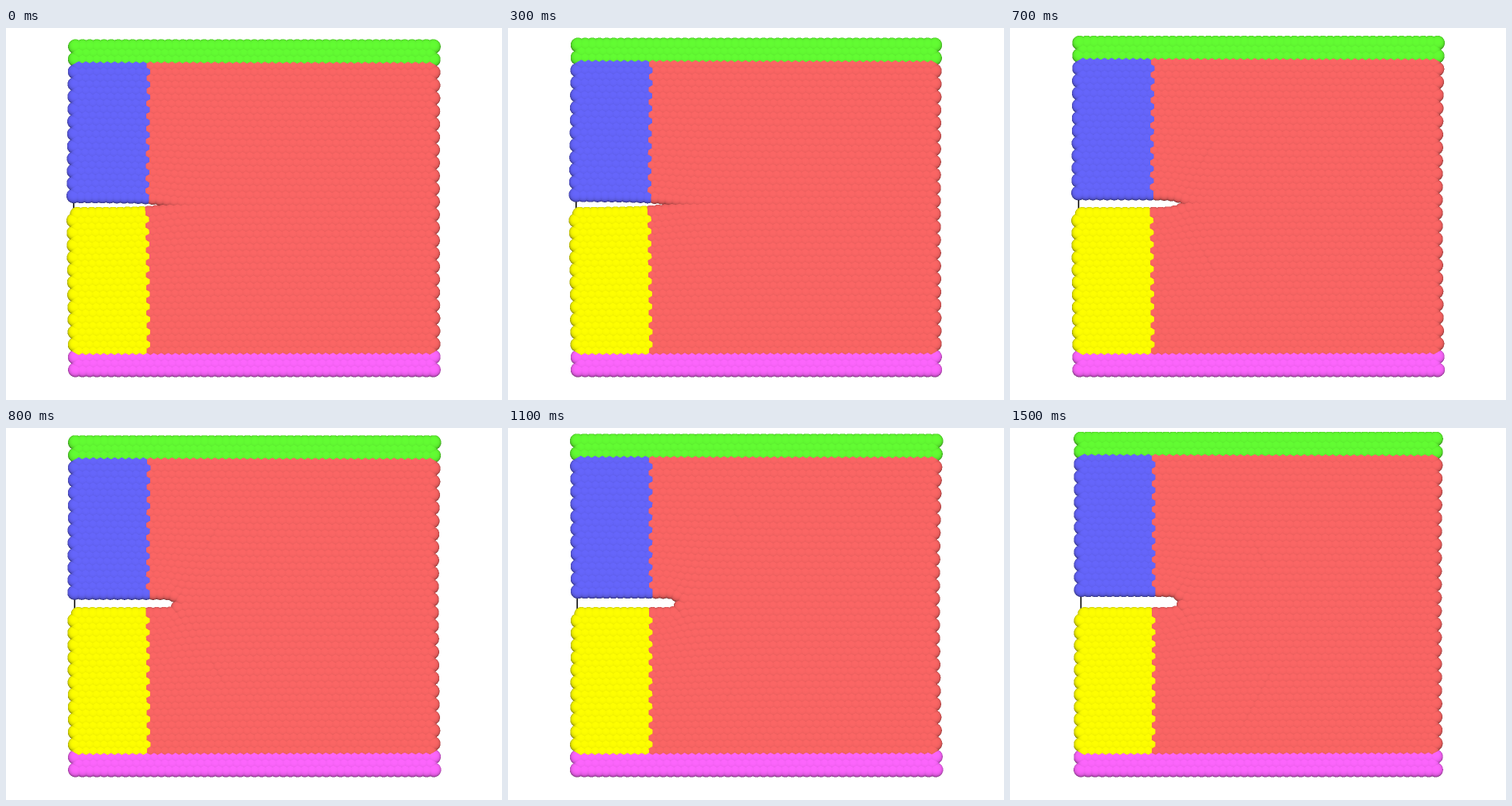
Recreate the animation shown at these times as an HTML page with a canvas. Size 640 by 480 pixels, loop 1600 ms.

```html
<!DOCTYPE html>
<html lang="en">
<head>
<meta charset="utf-8">
<title>Crack in a 2d lattice</title>
<style>
html, body { margin: 0; width: 640px; height: 480px; overflow: hidden; background: #fff; }
canvas { display: block; }
</style>
</head>
<body>
<canvas id="stage" width="640" height="480"></canvas>
<script>
const W = 640, H = 480, STEPS = 16, STEP_MS = 100;
const ROWS = 50, COLS = 50, BOTTOM = 441, R = 9.5;
const SS = 2; // supersampling

const RED = [251, 101, 100], BLUE = [101, 101, 251], YELLOW = [254, 254, 0],
      GREEN = [98, 252, 50], PINK = [252, 101, 252];

// step, left edge (corner, middle), right edge (corner, middle), crack tip x, tip softness
const POSES = [
  [0, 89.5, 87.3, 551.4, 550.4, 205, 30],
  [3, 90.3, 87.8, 550.6, 549.2, 207, 42],
  [5, 90.3, 88.3, 550.6, 549, 226, 28],
  [8, 89.5, 88.5, 552, 549.2, 219, 4],
  [11, 89.3, 90.3, 552, 548, 219, 4],
  [13, 91.2, 91.4, 550.5, 548.4, 219, 4],
  [15, 91.5, 92, 549.3, 547.8, 219, 4]
];

// dislocations: step, upper x, y, half length, lower x, y, half length
const SLIPS = [
  [3, 212, 222, 4, 212, 236, 4],
  [5, 230, 202, 14, 238, 265, 12],
  [8, 266, 142, 14, 270, 318, 12],
  [11, 294, 115, 10, 286, 345, 5],
  [13, 302, 128, 28, 301, 372, 8],
  [15, 322, 166, 12, 318, 347, 36]
];

function sample(table, k) {
  let n = 1;
  while (n < table.length - 1 && table[n][0] < k) n++;
  const a = table[n - 1], b = table[n];
  const f = (k - a[0]) / (b[0] - a[0]);
  return a.map((v, i) => v + (b[i] - v) * f);
}

function colorOf(i, j) {
  if (j < 3) return PINK;
  if (j > ROWS - 3) return GREEN;
  if (i > 10) return RED;
  return j > 25 ? BLUE : YELLOW;
}

function slipsAt(k) {
  if (k < 4) return [];
  const s = sample(SLIPS, k);
  const turn = k >= 11 ? 1 : -1; // they glide back after meeting the clamped rows
  return [
    { x: s[1], y: s[2], half: s[3], dx: 0.5, dy: 0.866 * turn },
    { x: s[4], y: s[5], half: s[6], dx: 0.5, dy: -0.866 * turn }
  ];
}

// opens a thin seam along a slip segment
function pushApart(p, s) {
  const x = p.x - s.x, y = p.y - s.y;
  const along = x * s.dx + y * s.dy, across = x * s.dy - y * s.dx;
  const beyond = Math.max(0, Math.abs(along) - s.half);
  const push = 1.3 * Math.sign(across) * Math.exp(-Math.abs(across) / 9 - beyond / 5);
  p.x += push * s.dy;
  p.y -= push * s.dx;
}

function atomsAt(k) {
  const [, xl, xlMid, xr, xrMid, tip, soft] = sample(POSES, k);
  const top = 24 - k * 2 / 3;
  const pitch = (BOTTOM - top) / ROWS;
  const slips = slipsAt(k);
  const atoms = [];
  for (let j = 0; j <= ROWS; j++) {
    const odd = j % 2, q = (j - 25) / 25;
    const left = xl + (xlMid - xl) * (1 - Math.abs(q));
    const right = xr + (xrMid - xr) * (1 - q * q);
    const strained = BOTTOM - j * pitch;
    const relaxed = j > 25 ? top + (ROWS - j) * (8.02 + 0.006 * k) : BOTTOM - j * 8.02;
    const d = Math.abs(j - 25.5) * pitch - pitch / 2;
    for (let n = 0; n <= COLS - odd; n++) {
      const i = n + odd / 2;
      const p = { x: left + (right - left) * i / COLS, y: 0, color: colorOf(i, j) };
      const s = p.x - tip;
      const r = Math.hypot(s, d, soft);
      p.y = strained + (relaxed - strained) * (r - s) / (2 * r);
      if (j > 2 && j < ROWS - 2) slips.forEach(slip => pushApart(p, slip));
      atoms.push(p);
    }
  }
  return atoms;
}

const LIGHT = [0.03, 0.24, 0.97];

function drawBalls(atoms, image) {
  const w = W * SS, h = H * SS, r = R * SS;
  const depth = new Float32Array(w * h), px = image.data;
  for (const { x, y, color } of atoms) {
    const cx = x * SS, cy = y * SS;
    const y1 = Math.min(h - 1, Math.floor(cy + r));
    for (let v = Math.max(0, Math.ceil(cy - r)); v <= y1; v++) {
      for (let u = Math.ceil(cx - r); u <= cx + r; u++) {
        const nx = (u + 0.5 - cx) / r, ny = (cy - v - 0.5) / r;
        const zz = 1 - nx * nx - ny * ny;
        const at = v * w + u;
        if (zz <= depth[at]) continue;
        depth[at] = zz;
        const lit = nx * LIGHT[0] + ny * LIGHT[1] + Math.sqrt(zz) * LIGHT[2];
        const shade = 1 - 0.5 * Math.pow(Math.max(0, 1 - lit), 1.7);
        const o = at * 4;
        px[o] = color[0] * shade;
        px[o + 1] = color[1] * shade;
        px[o + 2] = color[2] * shade;
        px[o + 3] = 255;
      }
    }
  }
}

function makeCanvas(w, h) {
  const c = document.createElement('canvas');
  c.width = w;
  c.height = h;
  return c;
}

const big = makeCanvas(W * SS, H * SS), bigCtx = big.getContext('2d');
const cache = [];

function picture(k) {
  if (cache[k]) return cache[k];
  const atoms = atomsAt(k);
  const image = bigCtx.createImageData(big.width, big.height);
  drawBalls(atoms, image);
  bigCtx.putImageData(image, 0, 0);

  const c = makeCanvas(W, H), g = c.getContext('2d');
  g.fillStyle = '#fff';
  g.fillRect(0, 0, W, H);
  // the simulation box wraps the outermost centres
  const xs = atoms.map(a => a.x), top = atoms[atoms.length - 1].y;
  g.fillStyle = '#000';
  for (const x of [Math.min(...xs), Math.max(...xs)]) g.fillRect(x - 0.8, top, 1.6, BOTTOM - top);
  g.drawImage(big, 0, 0, W, H);
  return cache[k] = c;
}

const ctx = document.getElementById('stage').getContext('2d');
const start = performance.now();
let shown = -1;

function tick() {
  const k = Math.floor((performance.now() - start) / STEP_MS) % STEPS;
  if (k !== shown) {
    ctx.drawImage(picture(k), 0, 0);
    shown = k;
  }
  requestAnimationFrame(tick);
}
tick();
</script>
</body>
</html>
```
